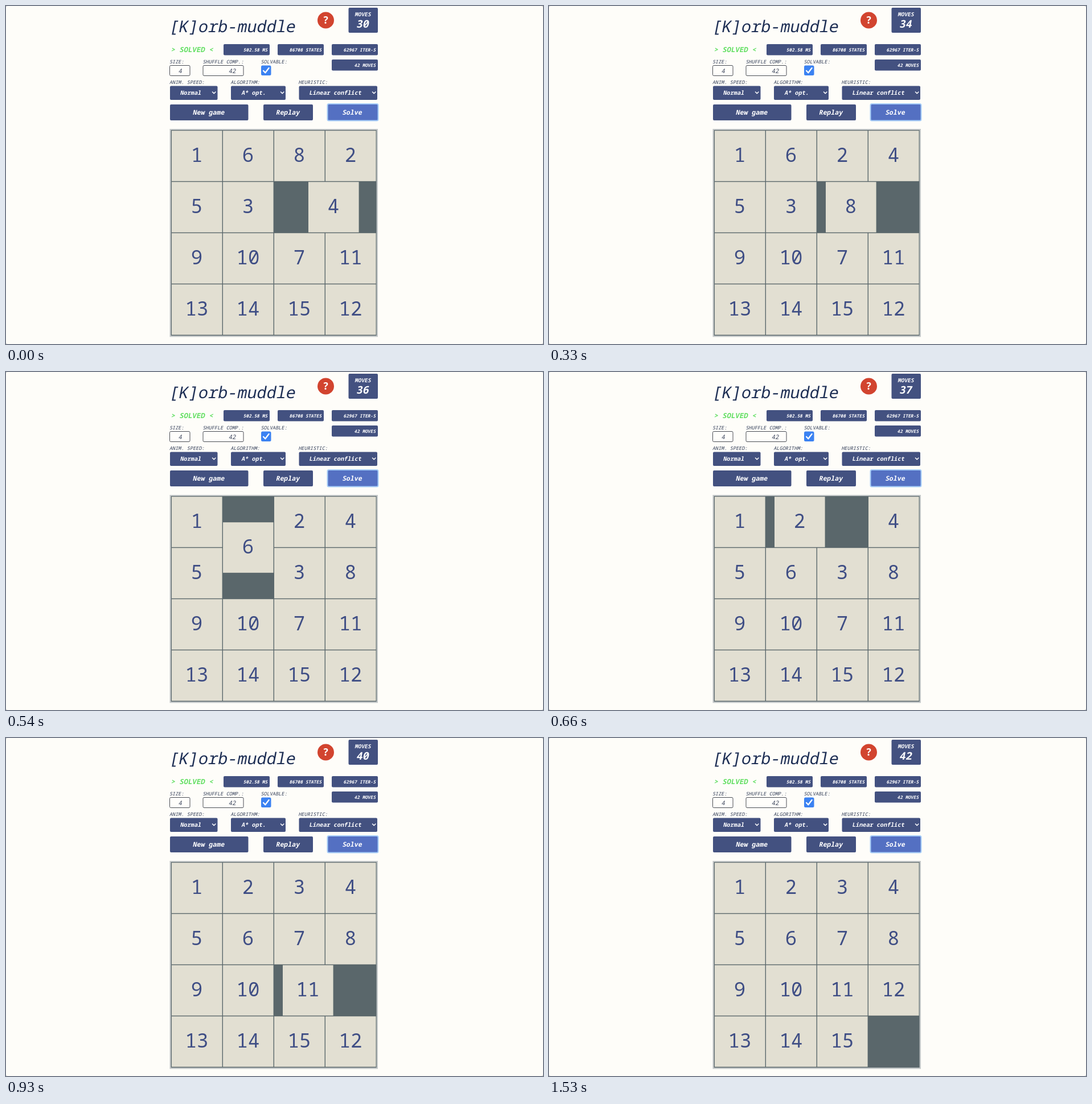
Recreate the animation shown at these times as an HTML page. Size 943 by 594 pixels, loop 1.56 s.

```html
<!DOCTYPE html>
<html lang="en">
<head>
<meta charset="utf-8">
<title>Sliding puzzle</title>
<style>
  html, body { margin: 0; width: 100%; height: 100%; overflow: hidden; background: #fefdf9; }
  svg { display: block; width: 943px; height: 594px; }
  text { font-family: "Noto Sans Mono", "DejaVu Sans Mono", monospace; white-space: pre; }
  .slant text { transform-box: fill-box; transform-origin: center; transform: skewX(-11deg); }
  .mid text { text-anchor: middle; }
  .end text { text-anchor: end; }
  .box { fill: #435180; }
  .light { fill: #fff; font-weight: 600; }
  .label { fill: #35405a; font-size: 8.6px; }
  .field { fill: #fffefb; stroke: #4a4d55; }
  .line { fill: none; stroke: #fff; stroke-linecap: round; stroke-linejoin: round; }
  .tile rect { fill: #e2dfd2; }
  .tile text { fill: #3f4e85; font-size: 34px; font-weight: 500; text-anchor: middle; }
</style>
</head>
<body>
<svg viewBox="0 0 943 594">
  <rect width="943" height="594" fill="#c9c9c8"/>
  <rect width="943" height="594" rx="3" fill="#fefdf9"/>

  <g class="box">
    <rect x="601.5" y="3" width="51.5" height="44" rx="2"/>
    <rect x="382" y="67" width="81" height="19.5" rx="2"/>
    <rect x="477" y="67" width="81" height="19.5" rx="2"/>
    <rect x="572" y="67" width="81" height="19.5" rx="2"/>
    <rect x="572" y="94" width="81" height="19.5" rx="2"/>
    <rect x="288" y="140.5" width="83.5" height="24.5" rx="2"/>
    <rect x="395" y="140.5" width="96" height="24.5" rx="2"/>
    <rect x="514.5" y="140.5" width="137.5" height="24.5" rx="2"/>
    <rect x="288" y="173" width="137.5" height="28" rx="2"/>
    <rect x="452" y="173" width="87" height="28" rx="2"/>
  </g>
  <rect x="564.5" y="172" width="89" height="29.5" rx="2.5" fill="#5470c2" stroke="#a6cdf8" stroke-width="2"/>
  <circle cx="561.5" cy="25" r="14.5" fill="#d2442f"/>
  <g class="field">
    <rect x="287.5" y="104.5" width="35.5" height="18" rx="2"/>
    <rect x="346" y="104.5" width="71" height="18" rx="2"/>
  </g>
  <rect x="448" y="104.5" width="17.5" height="17.5" rx="2.5" fill="#3b82f2"/>
  <path class="line" stroke-width="2.3" d="M452 113.8l3.3 3.5 6.3-8.3"/>
  <path class="line" stroke-width="1.5" d="M362.5 151l2.7 2.8 2.7-2.8M482.5 151l2.7 2.8 2.7-2.8M643.5 151l2.7 2.8 2.7-2.8"/>

  <g class="slant">
    <text x="287.5" y="46.5" font-size="28.5" font-weight="500" fill="#1e2f55">[K]orb-muddle</text>
    <text x="290.3" y="81.2" font-size="12.4" font-weight="600" fill="#62df62">&gt; SOLVED &lt;</text>
    <g class="label">
      <text x="287.5" y="101">SIZE:</text>
      <text x="346" y="101">SHUFFLE COMP.:</text>
      <text x="448" y="101">SOLVABLE:</text>
      <text x="287.5" y="137">ANIM. SPEED:</text>
      <text x="395" y="137">ALGORITHM:</text>
      <text x="514" y="137">HEURISTIC:</text>
    </g>
    <g class="mid" font-size="10.8" fill="#414a60">
      <text x="306.5" y="118">4</text>
      <text x="398" y="118">42</text>
    </g>
    <g class="light end" font-size="7.9">
      <text x="460" y="80">502.58 MS</text>
      <text x="555" y="80">86708 STATES</text>
      <text x="650" y="80">62967 ITER-S</text>
      <text x="650" y="107">42 MOVES</text>
    </g>
    <g class="light" font-size="10.2">
      <text x="306.5" y="156.2">Normal</text>
      <text x="414" y="156.2">A* opt.</text>
      <text x="533" y="156.2">Linear conflict</text>
    </g>
    <g class="light mid" font-size="11.6">
      <text x="356.5" y="191.2">New game</text>
      <text x="495.5" y="191.2">Replay</text>
      <text x="608.5" y="191.2">Solve</text>
      <text x="627.2" y="18.5" font-size="9.5">MOVES</text>
      <text x="627.2" y="38.3" font-size="18.5" id="count">30</text>
    </g>
  </g>
  <g class="light mid"><text x="561.5" y="31.3" font-size="17.5">?</text></g>

  <rect x="287.5" y="216" width="365.5" height="365.5" fill="#c4c8c9"/>
  <rect x="289.7" y="218" width="361" height="361.3" fill="#5a676b"/>
  <g id="board" transform="translate(291 219.2)"></g>
</svg>
<script>
  const LOOP = 1560, TICK = 30, CELL = 90, FIRST = 30;
  const start = [1, 6, 8, 2, 5, 3, 4, 0, 9, 10, 7, 11, 13, 14, 15, 12];
  const moves = [4, 8, 2, 4, 8, 3, 6, 2, 3, 7, 11, 12];
  // The first move slides the 4 in from the third column.
  const states = [start.slice()];
  for (const n of moves) {
    const s = states[states.length - 1].slice();
    const from = s.indexOf(n), to = s.indexOf(0);
    s[to] = n;
    s[from] = 0;
    states.push(s);
  }

  const board = document.getElementById('board');
  const count = document.getElementById('count');
  const NS = 'http://www.w3.org/2000/svg';

  function add(parent, tag, attrs) {
    const el = parent.appendChild(document.createElementNS(NS, tag));
    for (const key in attrs) el.setAttribute(key, attrs[key]);
    return el;
  }

  const tiles = [];
  for (let n = 1; n < 16; n++) {
    tiles[n] = add(board, 'g', { class: 'tile' });
    add(tiles[n], 'rect', { width: 88.6, height: 88.6 });
    add(tiles[n], 'text', { x: 44, y: 55 }).textContent = n;
  }

  function draw(time) {
    const tick = Math.floor(time % LOOP / TICK);
    // Tiles glide 30px per tick, with one half-length tick early on.
    const dist = tick * 30 + (tick < 4 ? 60 : 45);
    const done = Math.min(Math.floor(dist / CELL), moves.length);
    const part = dist % CELL / CELL;
    const now = states[done], next = states[done + 1] || now;
    for (let n = 1; n < 16; n++) {
      const a = now.indexOf(n), b = next.indexOf(n);
      const mix = (p, q) => (p + (q - p) * part) * CELL;
      const x = mix(a % 4, b % 4), y = mix(a >> 2, b >> 2);
      tiles[n].setAttribute('transform', `translate(${x} ${y})`);
    }
    count.textContent = FIRST + done;
  }

  const t0 = performance.now();
  function loop() {
    draw(performance.now() - t0);
    requestAnimationFrame(loop);
  }
  loop();
</script>
</body>
</html>
```
